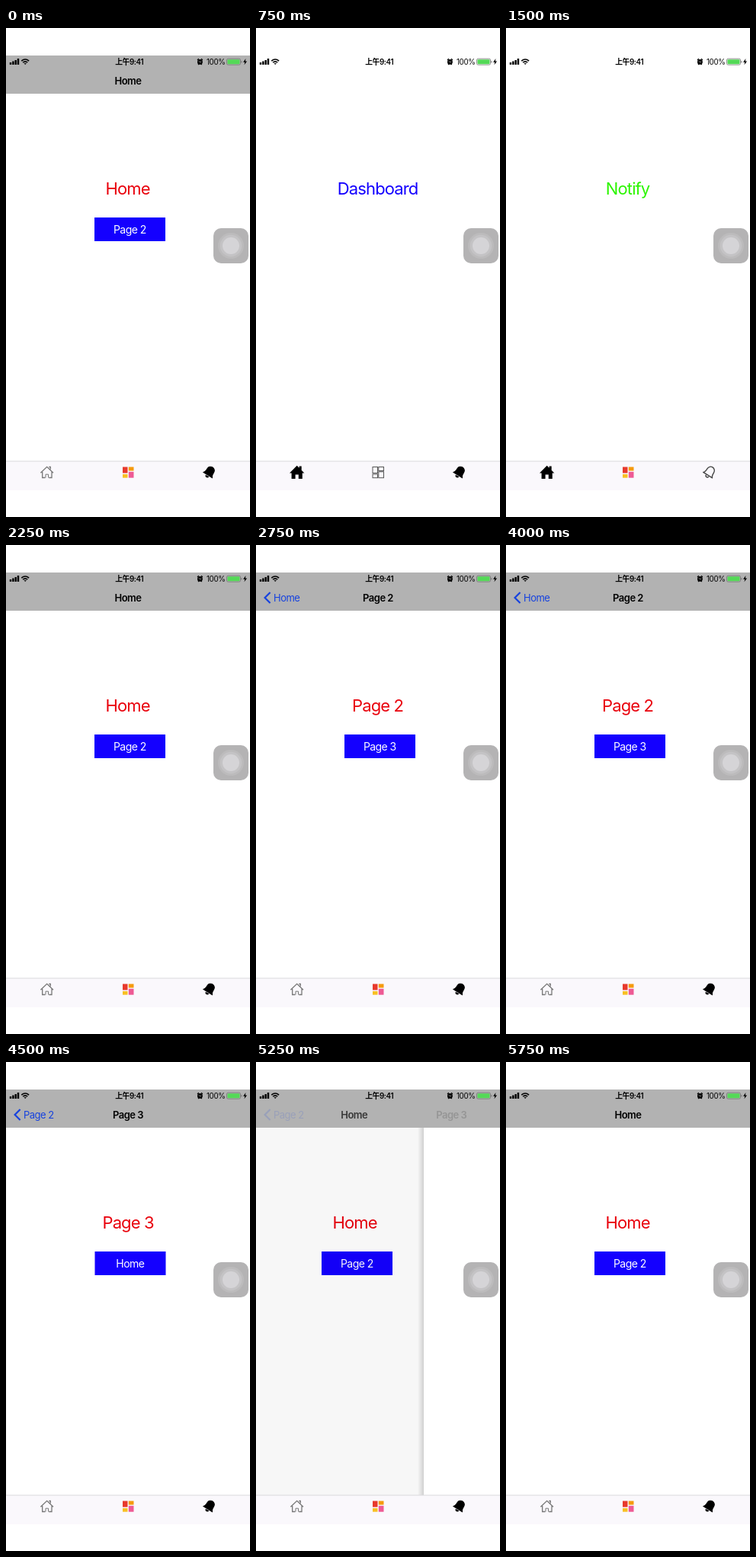
Animation, 320 px wide and 640 px high, one loop 6 s. Source, as an HTML page:

```html
<!DOCTYPE html>
<html lang="en">
<head>
<meta charset="utf-8">
<title>Tab and stack navigation</title>
<style>
  html, body { margin: 0; height: 100%; overflow: hidden; background: #fff; }
  svg { display: block; width: 100vw; height: 100vh; }
  text { font-family: Inter, "Noto Sans CJK SC", "Noto Sans CJK", sans-serif; letter-spacing: -.04em; }
  .mid { text-anchor: middle; }
  .heading { font-size: 22px; }
  .label { font-size: 14px; fill: #fff; }
  .nav { font-size: 13px; }
  .bold { font-weight: 600; }
  .status { font-size: 9.8px; }
</style>
</head>
<body>
<svg viewBox="0 0 320 640">
  <defs>
    <linearGradient id="shade">
      <stop offset="0" stop-opacity="0"/>
      <stop offset="1" stop-opacity=".16"/>
    </linearGradient>
    <clipPath id="content"><rect y="36" width="320" height="531"/></clipPath>
  </defs>

  <g id="views" clip-path="url(#content)"></g>
  <g id="header"></g>

  <g id="statusBar">
    <path d="M6 48v-3M9.4 48v-4.4M12.7 48v-6M16 48v-8" stroke="#000" stroke-width="2.4"/>
    <g fill="none" stroke="#000" stroke-width="1.6">
      <path d="M20.3 43.2q4.9-4.4 9.8 0M22.2 45.2q3-2.6 6 0"/>
      <path d="M23.9 46.3h2.6l-1.3 1.4z" fill="#000" stroke-width=".5"/>
    </g>
    <text class="status mid bold" x="161.7" y="48">上午9:41</text>
    <circle cx="254.4" cy="44.4" r="3.4"/>
    <path d="M251 42l1.8-1.8M257.8 42l-1.8-1.8M252 48l1-1M256.800 48l-1-1" stroke="#000" stroke-width="1.2"/>
    <path d="M252.900 43.200l1.500 1.600 1.700-.8" fill="none" stroke="#bbb" stroke-width=".8"/>
    <text class="status" x="263" y="48">100%</text>
    <rect x="289.500" y="40.200" width="18" height="8" rx="1.800" fill="none" stroke="#777" stroke-width=".8"/>
    <rect x="290.500" y="41.200" width="16" height="6" rx="1" fill="#54d957"/>
    <path d="M308.900 43v2.600" stroke="#777"/>
    <path d="M314.500 40l-3.500 4.700h2.200l-.7 3.500 3.600-4.800h-2.300z"/>
  </g>

  <rect y="567" width="320" height="38" fill="#faf8fc"/>
  <path d="M0 567h320" stroke="#dad9dc"/>
  <g id="tabs"></g>

  <g transform="translate(295 285)">
    <rect x="-23" y="-23" width="46" height="46" rx="10" fill="#b4b3b4"/>
    <circle r="17" fill="#bcbbbc"/>
    <circle r="14.200" fill="#c4c3c5"/>
    <circle r="11" fill="#d5d4d7"/>
  </g>
</svg>

<script>
const STEP = 250;
const RED = '#e9000c';
const pages = {
  home:      { title: 'Home', color: RED, button: 'Page 2', tab: 'home', nav: true },
  page2:     { title: 'Page 2', color: RED, button: 'Page 3', tab: 'home', nav: true, back: 'Home' },
  page3:     { title: 'Page 3', color: RED, button: 'Home', tab: 'home', nav: true, back: 'Page 2' },
  dashboard: { title: 'Dashboard', color: '#1400ff', tab: 'dashboard' },
  notify:    { title: 'Notify', color: '#2cf500', tab: 'notify' }
};

// [page, steps held, x offset of the top page, page revealed below]
const timeline = [
  ['home', 3], ['dashboard', 2], ['notify', 2], ['home', 3],
  ['page2', 1, .5], ['page2', 2], ['home', 2],
  ['page2', 1, .5], ['page2', 2],
  ['page3', 1, .5], ['page3', 2],
  ['page3', 1, 220, 'home'], ['home', 2]
];
const steps = timeline.flatMap(([page, count, x = 0, below]) => Array(count).fill({ page, x, below }));

const el = id => document.getElementById(id);

function view({ title, color, button }, x) {
  return `<g transform="translate(${x} 0)">
    ${x > 0 ? '<rect x="-8" y="86" width="8" height="481" fill="url(#shade)"/>' : ''}
    <rect y="36" width="320" height="531" fill="#fff"/>
    <text class="heading mid" x="159.600" y="218" fill="${color}">${title}</text>
    ${button ? `<rect x="116" y="248" width="93" height="31" fill="#1400ff"/>
    <text class="label mid" x="162.300" y="268.600">${button}</text>` : ''}
  </g>`;
}

function navItems({ title, back }, x, opacity) {
  return `<g opacity="${opacity}">
    <text class="nav bold mid" x="${160 + x}" y="73.600">${title}</text>
    ${back ? `<path d="M18.600 62l-7 7 7 7" fill="none" stroke="#1642df" stroke-width="2.200"/>
    <text class="nav" x="23" y="73.600" fill="#1642df">${back}</text>` : ''}
  </g>`;
}

function homeIcon(selected) {
  return selected
    ? `<g fill="none" stroke="#777" stroke-width="1.300">
        <path d="M45.400 582.300l8.300-8 8.300 8M47.700 581v7.500h3.800M60 581v7.500h-3.800M58.300 577.500v-3h-2"/>
        <path d="M52 588.500v-4.300h3.500v4.300" stroke-width="1"/></g>`
    : `<path d="M44 582.500l9.700-9.700 3 2.900v-2.200h3v5.200l3.700 3.800h-2.600v7.500h-5v-5.500h-4.200v5.500h-5v-7.500z"/>`;
}

function dashboardIcon(selected) {
  const tiles = [
    [153, 574.500, 6.500, 8, '#e8392c'], [160.800, 574.500, 6.700, 5, '#f59a0c'],
    [153, 584, 6.500, 4.700, '#f8c024'], [160.800, 580.800, 6.700, 7.900, '#ee5a95']
  ];
  return tiles.map(([x, y, w, h, color]) =>
    `<rect x="${x}" y="${y}" width="${w}" height="${h}" ${selected ? 'fill="none" stroke="#555"' : `fill="${color}"`}/>`
  ).join('');
}

function bellIcon(selected) {
  const paint = selected ? 'fill="none" stroke="#444" stroke-width="1.400"' : 'stroke="#000"';
  return `<g transform="translate(267 581.300) rotate(32)" ${paint} stroke-linejoin="round">
    <path d="M-7 4.500Q-5 3-5-2.500A5 5 0 0 1 5-2.500Q5 3 7 4.500z"/>
    <path d="M-2 5.500a2 2 0 0 0 4 0"/></g>`;
}

function draw({ page, x, below }) {
  const top = pages[page], under = pages[below];
  const progress = x / 320;
  el('views').innerHTML =
    (under ? view(under, -96 * (1 - progress)) +
      `<rect y="86" width="320" height="481" opacity="${.1 * (1 - progress)}"/>` : '') +
    view(top, x);
  el('header').innerHTML = top.nav
    ? '<rect y="36" width="320" height="50" fill="#b2b2b2"/>' +
      (under ? navItems(under, -100 * (1 - progress), progress) +
        navItems(top, 140 * progress, (1 - progress) / 2) : navItems(top, 0, 1))
    : '';
  el('tabs').innerHTML = homeIcon(top.tab === 'home') +
    dashboardIcon(top.tab === 'dashboard') + bellIcon(top.tab === 'notify');
}

let shown = -1;
function tick() {
  const index = Math.floor(performance.now() / STEP) % steps.length;
  if (index !== shown) draw(steps[shown = index]);
  requestAnimationFrame(tick);
}
tick();
</script>
</body>
</html>
```
